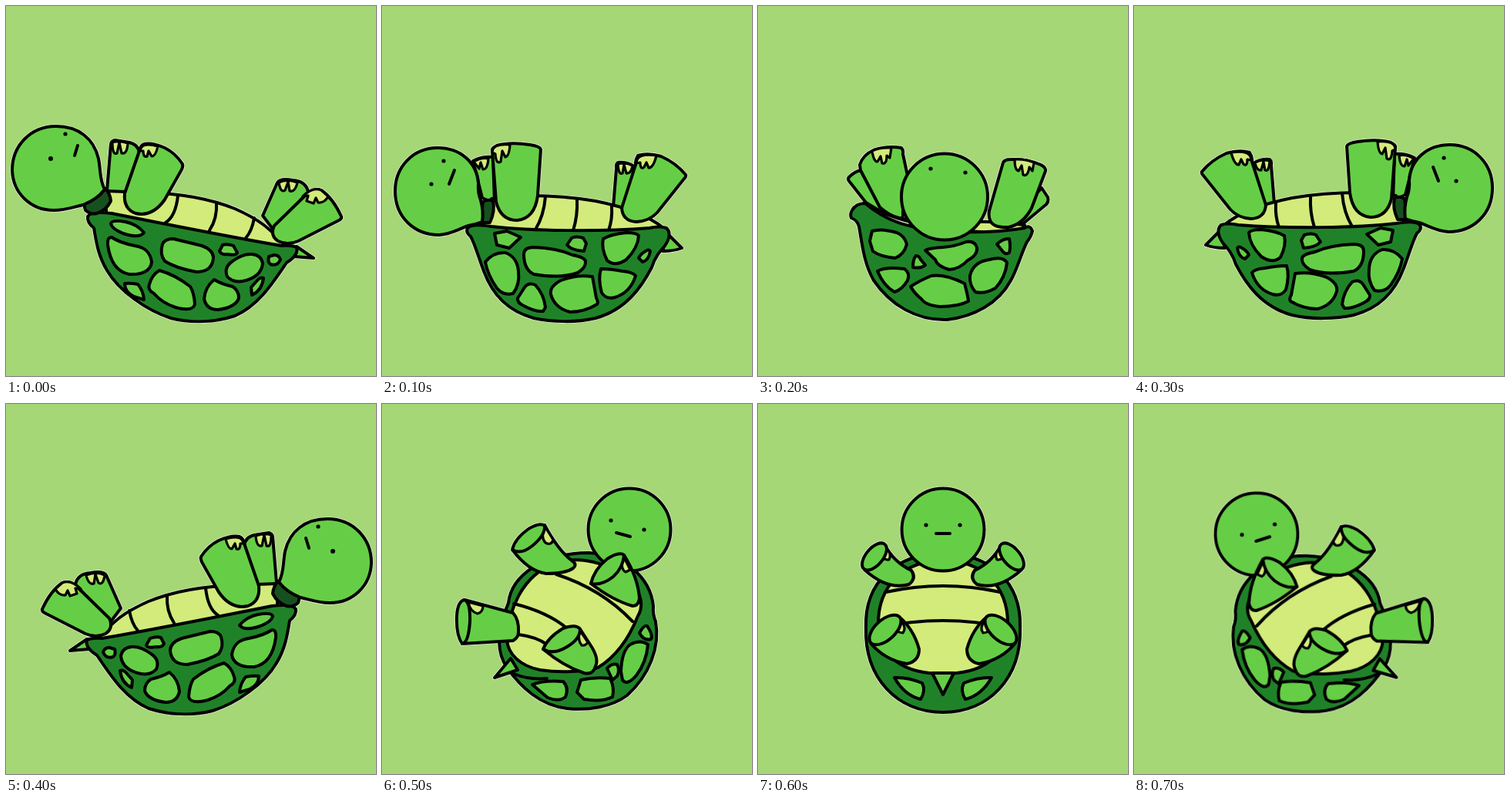
An HTML page that plays this animation: 480 by 480 pixels, repeating every 800 ms.

```html
<!DOCTYPE html>
<html lang="en">
<head>
<meta charset="utf-8">
<title>Spinning turtle</title>
<style>
html, body { margin: 0; width: 100%; height: 100%; overflow: hidden; background: #a6d776; }
svg { display: block; width: 100vw; height: 100vh; }
.skin { fill: #66ce46; }
.shell { fill: #208228; }
.belly { fill: #d3eb7b; }
.neck { fill: #17501f; }
.line { fill: none; }
.toe { fill: #d3eb7b; stroke-width: 3.2px; }
.eye { fill: #000; stroke: none; }
</style>
</head>
<body>
<svg id="stage" viewBox="0 0 480 480" stroke-linejoin="round" stroke-linecap="round">
<defs>
  <g id="tilted">
    <path class="skin" d="M105 305L83 320L108 318Z"/>
    <path class="skin" d="M90 234Q93 220 110 219Q126 216 130 222L149 265L130 290L100 245Z"/>
    <path class="toe" d="M104 222Q107 235 114 233L116 221L120 232Q126 236 128 222Q118 217 104 222Z"/>
    <path class="skin" d="M309 184Q310 173 322 170L341 167Q345 168 346 172L351 232L325 242Z"/>
    <path class="toe" d="M324 171Q325 186 332 184L335 170L338 184Q344 187 344 170Q336 167 324 171Z"/>
    <path class="belly" d="M118 305C135 290 140 276 185 256C220 242 260 236 300 235L352 233L352 262C280 277 180 297 118 305Z"/>
    <path class="line" d="M160 268Q163 285 171 294M209 248C208 265 212 275 218 284M259 239Q262 266 275 274"/>
    <path class="shell" d="M105 306Q112 303 125 304C200 291 290 273 345 262Q372 259 376 266Q377 274 368 281C365 300 362 318 351 336C336 362 300 388 268 398C240 405 210 403 185 395C155 382 137 354 118 326Q102 316 105 306Z"/>
    <path class="skin" d="M303 287Q312 276 327 273Q344 270 346 275Q345 282 330 288Q309 295 303 287Z"/>
    <path class="skin" d="M293 325C295 312 302 306 315 304Q335 300 345 293Q351 293 350 303C347 325 338 338 322 341C305 342 294 336 293 325Z"/>
    <path class="skin" d="M213 319Q214 309 228 304L265 295Q276 295 279 302Q283 315 276 324Q262 333 235 338Q214 338 213 319Z"/>
    <path class="skin" d="M182 313L187 304Q195 301 201 303L205 311Q203 316 195 315Q183 317 182 313Z"/>
    <path class="skin" d="M149 327Q151 316 163 315Q175 314 188 324Q200 332 195 344Q188 352 175 350Q151 345 149 327Z"/>
    <path class="skin" d="M126 322Q128 316 134 316L141 318Q143 325 139 328Q130 331 126 322Z"/>
    <path class="skin" d="M148 346Q152 344 157 350L164 358L163 368Q150 362 148 346Z"/>
    <path class="skin" d="M180 372Q180 362 188 357Q202 354 212 348Q224 358 225 373Q222 387 207 387Q184 384 180 372Z"/>
    <path class="skin" d="M237 380Q238 365 243 357Q262 342 283 336Q293 342 296 354Q299 361 290 366Q280 378 262 384Q240 390 237 380Z"/>
    <path class="skin" d="M303 374Q304 362 311 354Q321 352 328 353Q328 364 316 370Z"/>
    <path class="skin" d="M47 266Q58 242 73 232Q83 228 95 240L134 278Q140 291 129 298Q117 304 103 298L50 271Q46 269 47 266Z"/>
    <path class="toe" d="M64 240Q69 249 77 248L80 242L83 249L92 246L90 239L97 240Q84 227 73 232Z"/>
    <path class="skin" d="M253 198Q262 184 276 177Q292 170 303 172Q308 174 309 181L328 236Q330 256 314 262Q292 267 276 244L254 205Q252 201 253 198Z"/>
    <path class="toe" d="M285 175Q288 188 293 188L297 181L299 188Q304 190 304 181L308 181Q307 169 285 175Z"/>
    <path class="neck" d="M353 230Q364 243 381 250L379 258Q372 264 364 262Q352 258 346 246Q347 236 353 230Z"/>
    <path class="skin" d="M354 231C361 218 359 206 362 191C368 165 388 149 417 149C450 149 474 174 474 206C473 236 450 258 420 258C405 258 395 254 382 251Q364 244 354 231Z"/>
    <circle class="eye" cx="405" cy="159" r="2.6"/><circle class="eye" cx="424" cy="191" r="3"/>
    <path class="line" d="M389 174L393 187"/>
  </g>

  <g id="level">
    <path class="skin" d="M112 291L93 310Q103 314 118 314Z"/>
    <path class="skin" d="M155 204Q165 198 176 199Q179 202 178 207L182 256L165 270Z"/>
    <path class="toe" d="M157 203Q159 214 165 213L168 202L170 213Q175 216 176 201Q166 198 157 203Z"/>
    <path class="skin" d="M338 192Q352 191 364 197L352 245L336 252Z"/>
    <path class="toe" d="M344 194Q345 208 351 208L354 199L356 207L363 198Q353 192 344 194Z"/>
    <path class="belly" d="M117 284C140 265 175 255 205 249C235 244 270 242 290 242L340 246L352 284C270 289 190 292 117 284Z"/>
    <path class="line" d="M184 256Q183 273 188 287M229 247Q228 268 234 287M270 243Q272 268 283 286"/>
    <path class="shell" d="M113 284Q122 281 135 284C200 289 290 288 340 282Q365 278 371 284Q374 290 367 295C361 306 357 322 350 340C338 372 318 392 285 401C262 406 230 407 205 401C165 390 145 360 132 335C128 322 122 315 115 307Q105 292 113 284Z"/>
    <path class="skin" d="M149 294Q152 290 165 290Q185 292 195 298Q198 310 190 326Q180 335 165 325Q150 310 149 294Z"/>
    <path class="skin" d="M217 304L221 297Q230 294 236 297L242 306Q236 313 220 314Z"/>
    <path class="skin" d="M134 314Q136 311 140 314Q147 318 149 323L144 328Q136 326 134 314Z"/>
    <path class="skin" d="M218 327Q219 322 235 319Q255 310 285 309Q298 309 298 318Q298 338 285 344Q250 350 228 342Q217 335 218 327Z"/>
    <path class="skin" d="M302 296L320 288L336 291L333 306L317 310Z"/>
    <path class="skin" d="M305 341Q306 322 322 316Q338 315 348 328Q345 345 333 362Q325 372 312 369Q303 357 305 341Z"/>
    <path class="skin" d="M153 346Q157 341 170 340Q185 337 198 337Q202 350 197 368Q191 377 180 374Q160 368 153 346Z"/>
    <path class="skin" d="M209 347Q230 344 250 352Q265 360 263 370Q258 388 238 393Q220 393 203 383Q201 380 204 375Z"/>
    <path class="skin" d="M270 387Q272 370 283 358Q292 354 297 361L306 375Q307 381 298 385Q283 393 273 392Z"/>
    <path class="skin" d="M88 215Q100 200 120 191Q137 186 150 190Q154 196 153 202L171 258Q170 275 152 276Q135 275 125 264L90 220Q87 217 88 215Z"/>
    <path class="toe" d="M126 190Q130 206 136 206L139 199L142 205Q147 209 147 199L152 200Q152 186 126 190Z"/>
    <path class="skin" d="M276 182Q277 178 290 176Q315 172 333 177Q340 180 339 184L334 250Q328 274 307 274Q284 272 280 242Z"/>
    <path class="toe" d="M316 176Q317 191 322 192L326 184L328 198Q334 202 335 188L339 186Q339 174 316 176Z"/>
    <path class="neck" d="M338 249Q345 246 351 250L354 277L342 277Q335 262 338 249Z"/>
    <path class="skin" d="M352 276Q350 262 354 248Q358 238 357 226C359 199 380 180 410 180C442 180 465 205 465 236C465 270 440 293 408 293C392 292 382 285 370 281Q360 279 352 276Z"/>
    <circle class="eye" cx="402" cy="197" r="2.6"/><circle class="eye" cx="418" cy="227" r="2.6"/>
    <path class="line" d="M388 209L395 227"/>
  </g>

  <g id="front">
    <path class="skin" d="M118 222Q125 215 133 213L165 270L140 255L118 227Q116 224 118 222Z"/>
    <path class="skin" d="M368 236L376 248Q378 255 372 259L342 284L335 270Z"/>
    <path class="belly" d="M137 256C150 265 175 275 200 278L300 280L346 284L340 293C270 296 190 287 137 256Z"/>
    <path class="shell" d="M122 265Q127 256 139 256C165 278 190 287 240 292Q300 296 346 288Q353 283 356 292Q354 300 349 306C341 322 337 340 328 356C312 386 280 403 245 407C205 408 172 388 150 356C137 333 135 308 131 286Q129 278 121 275Q119 270 122 265Z"/>
    <path class="skin" d="M145 305L148 292Q160 288 180 294Q190 298 193 309Q190 322 178 327Q158 325 149 318Z"/>
    <path class="skin" d="M310 309Q318 301 326 302Q328 312 326 320Q322 323 318 319Z"/>
    <path class="skin" d="M205 324Q209 324 211 329L217 336Q212 341 201 339Q201 328 205 324Z"/>
    <path class="skin" d="M217 317Q222 314 240 313Q255 312 270 306Q282 304 284 314Q285 323 272 330Q262 341 248 342Q232 337 230 329Z"/>
    <path class="skin" d="M155 344Q165 338 190 341Q198 347 194 356Q187 368 177 371Q163 363 155 344Z"/>
    <path class="skin" d="M275 350Q279 332 300 329Q318 324 323 333Q321 352 308 366Q294 374 282 371Q274 362 275 350Z"/>
    <path class="skin" d="M198 364Q210 356 225 350Q242 347 268 360Q272 375 273 383Q260 390 236 390Q217 388 212 380Q203 373 198 364Z"/>
    <path class="skin" d="M132 206Q136 193 150 187Q168 181 186 184Q189 187 188 192L194 220L188 268Q189 277 183 275Q170 272 158 261L133 213Z"/>
    <path class="toe" d="M148 188Q150 202 155 202L159 195L161 204Q167 206 167 194L171 197L173 184Q158 183 148 188Z"/>
    <path class="skin" d="M318 203Q320 199 328 199Q349 198 367 206Q374 210 373 214L355 262Q344 283 325 287Q305 288 301 278Q298 270 301 262Z"/>
    <path class="toe" d="M333 199Q333 213 338 214L342 207L344 219Q350 222 352 209L356 214L358 203Q346 198 333 199Z"/>
    <circle class="skin" cx="242" cy="247.500" r="56"/>
    <circle class="eye" cx="224" cy="211" r="2.6"/><circle class="eye" cx="269" cy="216" r="2.6"/>
  </g>

  <g id="raised">
    <path class="shell" d="M164 258C168 222 210 193 268 193C315 195 348 225 352 262Q351 273 355 282C361 315 347 352 318 378C298 393 268 398 240 395C205 391 181 368 162 342C150 324 147 300 164 258Z"/>
    <path class="skin" d="M167 330L146 355L176 345Z"/>
    <path class="belly" d="M162 305C164 270 180 222 226 206C262 195 305 210 328 236C338 252 338 265 332 275C322 300 305 327 280 342C255 349 225 348 205 345C180 340 163 325 162 305Z"/>
    <path class="line" d="M226 221Q285 240 325 282M171 259Q215 270 240 291M177 299Q200 302 214 312M171 350Q190 358 214 356"/>
    <path class="skin" d="M195 364Q210 358 235 360Q243 368 238 380Q230 387 215 381Z"/>
    <path class="skin" d="M253 374L258 358Q275 354 296 356Q302 368 299 380Q285 387 262 383Z"/>
    <path class="skin" d="M292 343Q298 336 305 338Q309 345 305 353L299 358Z"/>
    <path class="skin" d="M310 347Q311 320 322 312Q335 305 345 312Q343 335 330 352Q318 366 312 358Z"/>
    <path class="skin" d="M334 297Q340 286 344 288Q352 300 349 305Q340 308 334 297Z"/>
    <circle class="skin" cx="321" cy="163" r="53.500"/>
    <circle class="eye" cx="297" cy="151" r="2.6"/><circle class="eye" cx="340" cy="163" r="2.6"/>
    <path class="line" d="M304 167L322 172"/>
    <path class="skin" d="M169 189Q190 217 213 220Q238 220 248 213Q254 208 246 203Q228 189 211 157Z"/>
    <path class="toe" d="M212 160Q205 172 212 180Q220 184 222 176Z"/>
    <path class="skin" d="M169 189Q172 175 190 162Q205 153 211 158Q212 170 195 184Q180 196 169 189Z"/>
    <path class="skin" d="M271 233Q300 255 325 262Q333 262 334 252Q332 225 314 196Z"/>
    <path class="toe" d="M314 199Q308 213 316 218L322 215Z"/>
    <path class="skin" d="M271 233Q275 215 292 201Q308 191 314 196Q313 212 300 224Q285 236 271 233Z"/>
    <path class="skin" d="M107 254L170 271Q178 280 177 296Q177 303 170 307L104 311Z"/>
    <path class="toe" d="M112 257Q114 269 124 272Q131 270 131 262Z"/>
    <path class="skin" d="M97 275Q98 256 107 254Q115 258 114 283Q112 310 104 311Q96 300 97 275Z"/>
    <path class="skin" d="M209 318Q235 340 262 349Q274 352 277 340Q282 330 270 312L257 292Z"/>
    <path class="toe" d="M257 294Q253 306 259 313Q264 314 267 309Z"/>
    <path class="skin" d="M209 318Q215 303 235 291Q252 285 257 292Q257 305 240 315Q222 326 209 318Z"/>
  </g>

  <g id="legs">
    <path class="skin" d="M316 182Q304 205 281 216Q274 226 284 234Q312 242 342 215Z"/>
    <path class="toe" d="M314 186Q306 195 310 202Q318 203 321 194Z"/>
    <ellipse class="skin" cx="329" cy="198" rx="21" ry="11" transform="rotate(50 329 198)"/>
    <path class="skin" d="M297 276Q278 292 271 318Q271 334 287 337Q316 332 334 310Z"/>
    <path class="toe" d="M294 281Q287 291 292 297Q300 297 302 288Z"/>
    <ellipse class="skin" cx="315" cy="293" rx="25" ry="13" transform="rotate(42 315 293)"/>
  </g>
  <g id="rear">
    <path class="shell" d="M140 290C138 230 180 194 240 194C300 194 342 230 340 290C342 355 300 400 240 400C180 400 138 355 140 290Z"/>
    <path class="belly" d="M156 285C156 235 190 203 240 203C290 203 324 235 324 285C322 330 290 350 240 350C190 350 158 330 156 285Z"/>
    <path class="line" d="M166 244Q240 228 314 244M157 290Q240 272 323 290"/>
    <path class="skin" d="M226 349L240 377L254 349Z"/>
    <path class="skin" d="M177 355Q194 354 213 362Q218 372 211 383Q190 378 177 355Z"/>
    <path class="skin" d="M303 355Q286 354 267 362Q262 372 269 383Q290 378 303 355Z"/>
    <circle class="skin" cx="240" cy="163" r="53.500"/>
    <circle class="eye" cx="218" cy="157" r="2.6"/><circle class="eye" cx="262" cy="157" r="2.6"/>
    <path class="line" d="M231 168L249 168"/>
    <use href="#legs"/>
    <use href="#legs" transform="translate(480) scale(-1 1)"/>
  </g>
</defs>
</svg>
<script>
const STEP = 100;
const flip = (x, y = 0) => `translate(${x} ${y}) scale(-1 1)`;

// one full turn: pose and placement for each step
const turn = [
  ["tilted", flip(482, 7)],
  ["level", flip(482, 4)],
  ["front", ""],
  ["level", ""],
  ["tilted", ""],
  ["raised", ""],
  ["rear", ""],
  ["raised", "rotate(-2 330 280) " + flip(484)]
];

const stage = document.getElementById("stage");

function add(parent, tag, attrs) {
  const el = document.createElementNS("http://www.w3.org/2000/svg", tag);
  for (const name in attrs) el.setAttribute(name, attrs[name]);
  return parent.appendChild(el);
}

turn.forEach(([pose, transform], i) => {
  const g = add(stage, "g", { transform });
  // thin pale rim under the black line work
  add(g, "use", { href: "#" + pose, stroke: "#f4fbea", "stroke-width": 5.2 });
  add(g, "use", { href: "#" + pose, stroke: "#000", "stroke-width": 4 });

  const n = turn.length;
  const key = (opacity, at) => ({ opacity, offset: at / n, easing: "step-end" });
  g.animate([key(0, 0), key(1, i), key(0, i + 1), key(0, n)],
    { duration: n * STEP, iterations: Infinity });
});
</script>
</body>
</html>
```
